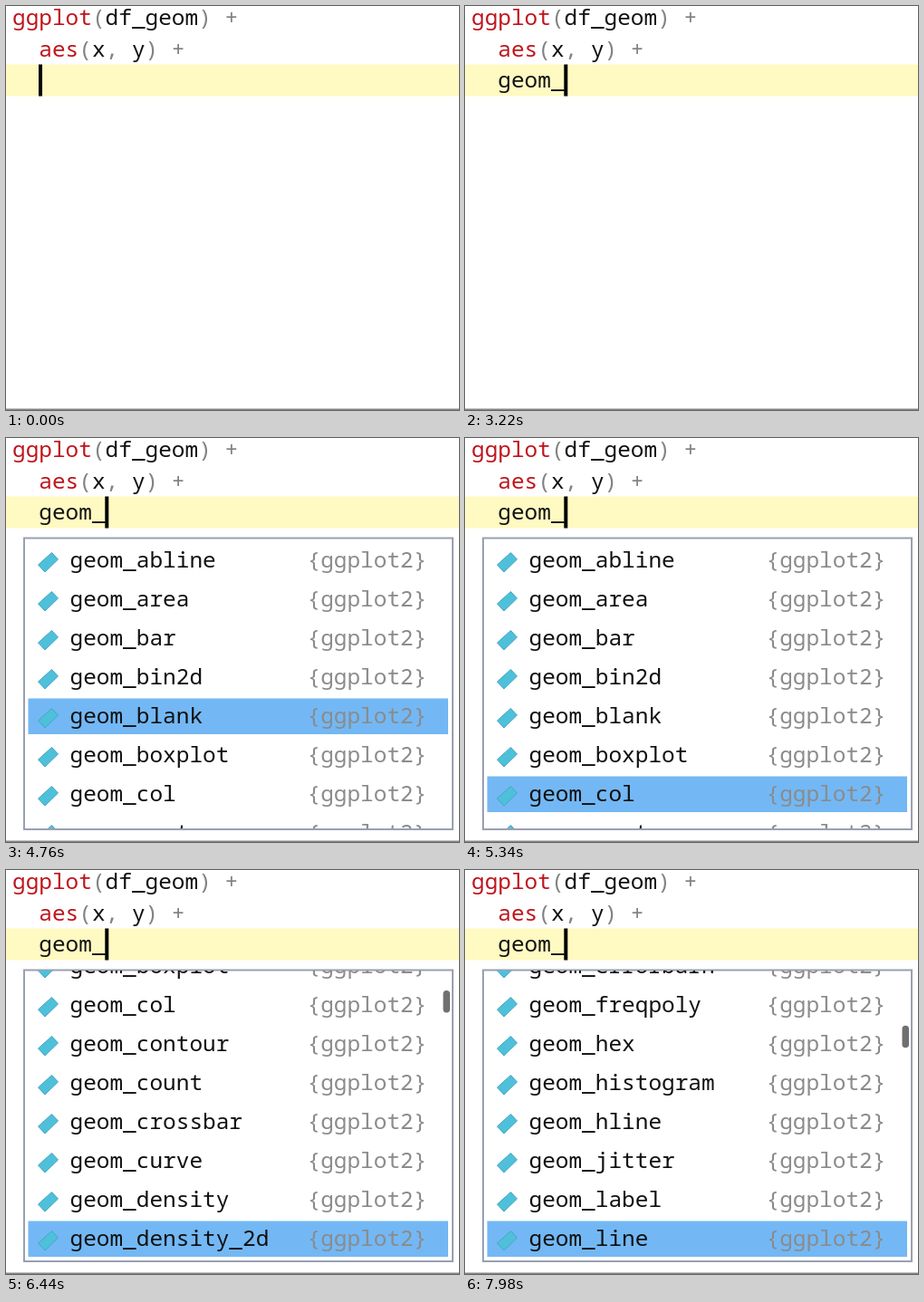
An HTML page that plays this animation: 500 by 446 pixels, repeating every 8 s.

```html
<!DOCTYPE html>
<html lang="en">
<head>
<meta charset="utf-8">
<title>Code completion</title>
<style>
  html, body { margin: 0; width: 100%; height: 100%; overflow: hidden; background: #fff; }
  svg { display: block; }
  text { font: 24.43px "Noto Sans Mono", monospace; white-space: pre; fill: #111; }
  .fn { fill: #c0141c; }
  .op { fill: #828282; }
  .pkg { fill: #8b8b8b; }
</style>
</head>
<body>
<svg width="500" height="446" viewBox="0 0 500 446">
  <defs>
    <clipPath id="view"><rect x="21" y="111" width="472" height="320"/></clipPath>
    <path id="icon" d="M50.5 -8.5L57.5 -1L43 13L35.5 5Z" fill="#4fc0da" stroke="#45a6c2"/>
  </defs>
  <rect y="64.5" width="500" height="35" fill="#fff9c2"/>
  <rect y="444.5" width="500" height="1.5" fill="#85858c"/>
  <text x="7" y="21"><tspan class="fn">ggplot</tspan><tspan class="op">(</tspan>df_geom<tspan class="op">) +</tspan></text>
  <text x="36.3" y="56"><tspan class="fn">aes</tspan><tspan class="op">(</tspan>x<tspan class="op">,</tspan> y<tspan class="op">) +</tspan></text>
  <text id="typed" x="36.3" y="90"></text>
  <rect id="caret" y="64.5" width="4" height="35" fill="#000"/>
  <g id="popup">
    <rect x="20" y="110.5" width="473" height="321.5" fill="#fff" stroke="#9a9fb1" stroke-width="2"/>
    <g clip-path="url(#view)">
      <g id="list"><rect id="selection" x="24.5" width="463.5" height="39.5" fill="#73b8f4"/></g>
    </g>
    <rect id="thumb" x="482.5" width="7.5" height="24.5" rx="3.75" fill="#707070"/>
  </g>
</svg>
<script>
const DURATION = 8000, PITCH = 14.66, ROW = 43, FIRST_ROW = 135, LAST_VISIBLE = 6;
const names = ("abline area bar bin2d blank boxplot col contour count crossbar curve density " +
  "density_2d density2d dotplot errorbar errorbarh freqpoly hex histogram hline jitter label line").split(" ");
const keyTimes = [1840, 2040, 2320, 2520, 2800];
const popupTime = 3400;
// [time, selected row]: the down key repeats evenly between these points
const presses = [[3400, 0], [4080, 2], [5240, 6], [6420, 12], [7500, 18], [7960, 23]];

const el = id => document.getElementById(id);
const [typed, caret, popup, list, selection, thumb] =
  ["typed", "caret", "popup", "list", "selection", "thumb"].map(el);

names.forEach((name, i) => list.insertAdjacentHTML("beforeend",
  `<g transform="translate(0 ${FIRST_ROW + i * ROW})"><use href="#icon"/>` +
  `<text x="70.5" y="8">geom_${name}</text><text class="pkg" x="332.5" y="8">{ggplot2}</text></g>`));

function selectedAt(t) {
  for (let i = 1; i < presses.length; i++) {
    const [t0, r0] = presses[i - 1], [t1, r1] = presses[i];
    if (t < t1) return Math.max(0, Math.floor(r0 + (r1 - r0) * (t - t0) / (t1 - t0)));
  }
  return names.length - 1;
}

function show(node, visible) {
  node.setAttribute("visibility", visible ? "inherit" : "hidden");
}

function draw(t) {
  const count = keyTimes.filter(k => t >= k).length;
  typed.textContent = "geom_".slice(0, count);
  caret.setAttribute("x", 36 + count * PITCH);
  show(caret, t < 640 || t >= 1100);

  const row = selectedAt(t);
  const scroll = row > LAST_VISIBLE ? (row - LAST_VISIBLE) * ROW - 14 : 0;
  popup.setAttribute("visibility", t >= popupTime ? "visible" : "hidden");
  list.setAttribute("transform", `translate(0 ${-scroll})`);
  selection.setAttribute("y", FIRST_ROW - 19.5 + row * ROW);
  thumb.setAttribute("y", 113 + scroll * 0.082);
  show(thumb, scroll > 0);
}

function tick() {
  draw(performance.now() % DURATION);
  requestAnimationFrame(tick);
}
tick();
</script>
</body>
</html>
```
